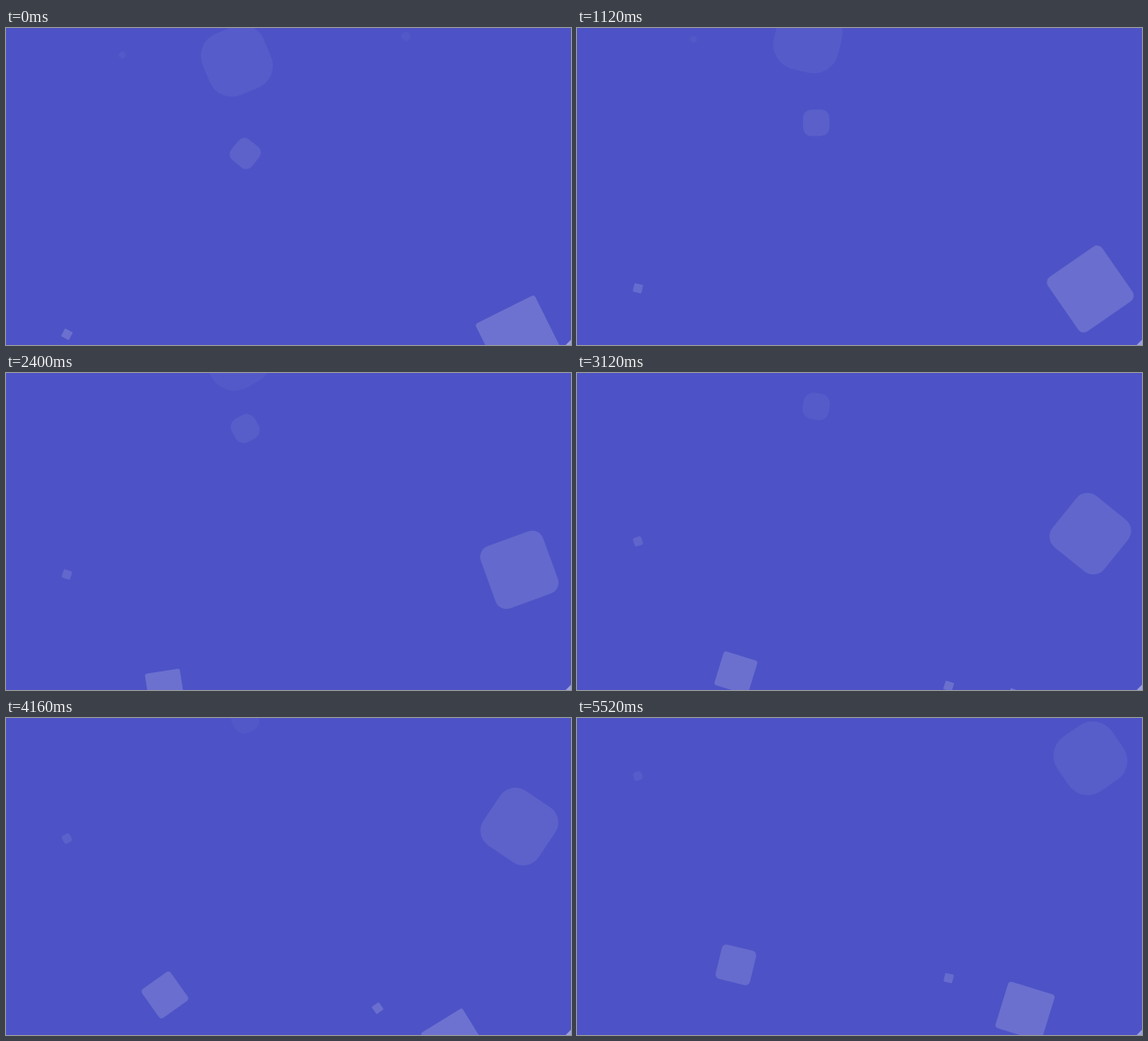
An HTML page with a canvas for the animation above (5600 ms loop, 640 px wide and 359 px high).

```html
<!DOCTYPE html>
<html>
<head>
<meta charset="utf-8">
<title>Floating squares</title>
<style>
  html, body { margin: 0; width: 100%; height: 100%; overflow: hidden; background: #4d53c6; }
  canvas { display: block; }
</style>
</head>
<body>
<canvas id="stage" width="640" height="359"></canvas>
<script>
const W = 640, H = 359;
const ctx = document.getElementById('stage').getContext('2d');

const LOOP = 5600, STEP = 80;   // playback, ms
const START = 99.92;            // seconds the squares have already been rising
const RISE = 500, BELOW = 75;   // travel and starting depth under the stage

// left edge in % of the width, side in px, times in seconds
const squares = [
  { left: 10, delay: 2, duration: 12 },
  { left: 20, size: 7.5, delay: 2, duration: 35 },
  { left: 25, size: 40 },
  { left: 35, size: 75, delay: 7 },
  { left: 40, size: 30, duration: 18 },
  { left: 65 },
  { left: 70, delay: 4 },
  { left: 75, size: 55, delay: 3 },
  { left: 85, size: 75, duration: 11 },
];

// A square rises, turns twice, fades out and rounds off into a circle.
function drawSquare({ left, size = 10, delay = 0, duration = 25 }, seconds) {
  const p = (seconds - delay) / duration % 1;
  const half = size / 2;
  ctx.save();
  ctx.translate(left / 100 * W + half, H + BELOW - half - RISE * p);
  ctx.rotate(4 * Math.PI * p);
  ctx.fillStyle = `rgba(255, 255, 255, ${0.2 * (1 - p)})`;
  ctx.beginPath();
  ctx.roundRect(-half, -half, size, size, half * p);
  ctx.fill();
  ctx.restore();
}

function drawCorner(size) {
  ctx.fillStyle = 'rgba(255, 255, 255, .45)';
  ctx.beginPath();
  ctx.moveTo(W, H - size);
  ctx.lineTo(W, H);
  ctx.lineTo(W - size, H);
  ctx.fill();
}

function draw(ms) {
  // The opening pose is held for two steps; each later step is 0.1 s of motion.
  const step = Math.max(0.5, Math.floor(ms % LOOP / STEP) - 1);
  ctx.clearRect(0, 0, W, H);
  for (const square of squares) drawSquare(square, START + step / 10);
  drawCorner(6);
}

const begin = performance.now();
function tick() {
  draw(performance.now() - begin);
  requestAnimationFrame(tick);
}
tick();
</script>
</body>
</html>
```
